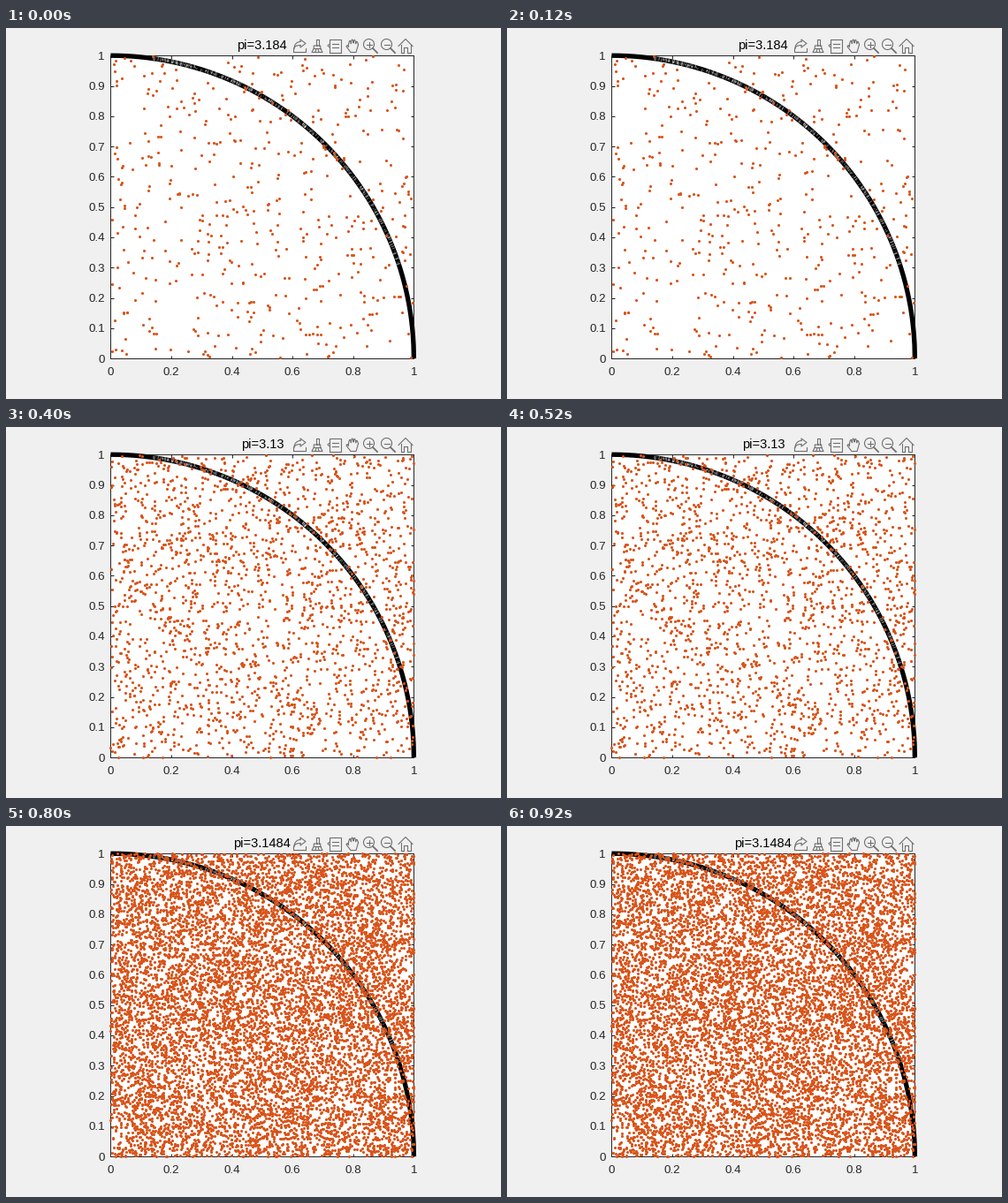
A matplotlib script that plays this animation: 560 px wide and 420 px high, repeating every 1000 ms.

```python
import numpy as np
import matplotlib.pyplot as plt
from matplotlib.animation import FuncAnimation
from matplotlib.collections import LineCollection

W, H, DPI = 560, 420, 100
PX = 72 / DPI                       # points per pixel
LEFT, TOP, SIDE = 118.4, 31.2, 343  # plot square in pixels
INK, ICON, ORANGE = "#262626", "#707070", "#D95319"

# number of points thrown -> estimate of pi
ESTIMATES = {500: 3.184, 1000: 3.172, 2000: 3.13, 5000: 3.156, 10000: 3.1484}
ROUNDS = list(ESTIMATES.items())

plt.rcParams["font.family"] = "Liberation Sans"
fig = plt.figure(figsize=(W / DPI, H / DPI), dpi=DPI, facecolor="#F0F0F0")


def throw(n, estimate):
    """Random points in the unit square whose share inside the arc gives the estimate."""
    hits = round(n * estimate / 4)
    pool = np.random.default_rng(n).random((3 * n, 2))
    inside = np.hypot(*pool.T) <= 1
    return np.vstack([pool[inside][:hits], pool[~inside][:n - hits]]).T


def make_plot():
    ax = fig.add_axes([LEFT / W, 1 - (TOP + SIDE) / H, SIDE / W, SIDE / H])
    ax.set(xlim=(0, 1), ylim=(0, 1))
    ax.set_axisbelow(True)
    xs, ys = np.linspace(0, 1, 6), np.linspace(0, 1, 11)
    ax.set_xticks(xs, [f"{v:.2g}" for v in xs])
    ax.set_yticks(ys, [f"{v:.2g}" for v in ys])
    ax.tick_params(direction="in", top=True, right=True, length=3.5 * PX,
                   width=PX, color=INK, labelcolor=INK, labelsize=13.33 * PX)
    ax.tick_params(axis="x", pad=9.4 * PX)
    ax.tick_params(axis="y", pad=6.6 * PX)
    for spine in ax.spines.values():
        spine.set(color=INK, linewidth=PX, zorder=0.9)
    return ax


def draw_arc(ax, seams=380):
    x = np.linspace(0, 1, 1001)
    ax.plot(x, np.sqrt(1 - x * x), color="black", lw=5.3 * PX, zorder=2,
            solid_capstyle="butt", solid_joinstyle="bevel", clip_on=False)
    # pale seams where the short segments meet
    rng = np.random.default_rng(4)
    angle = np.radians(rng.uniform(18, 82, seams))
    rim = np.column_stack([np.cos(angle), np.sin(angle)])
    reach = rng.uniform(0.6, 2.5, (seams, 1)) / SIDE
    middle = 1 + rng.uniform(-1, 1, (seams, 1)) / SIDE
    lines = np.stack([rim * (middle - reach), rim * (middle + reach)], axis=1)
    colors = np.ones((seams, 4))
    colors[:, 3] = rng.uniform(0.15, 0.6, seams)
    ax.add_collection(LineCollection(lines, colors=colors, linewidths=0.8 * PX,
                                     zorder=2.1), autolim=False)


def draw_toolbar(ax):
    centers = iter(range(332, 453, 20))

    def stroke(cx, x, y, lw=1.1):
        ax.plot(cx + np.asarray(x), 20 + np.asarray(y), color=ICON, lw=lw * PX)

    def mirrored(cx, x, y):
        stroke(cx, [*x, *(-v for v in reversed(x))], [*y, *reversed(y)])

    def export(cx):
        bend = np.linspace(0, np.pi / 2, 12)
        for bottom in (-4.5, -0.5):
            stroke(cx, 1 - 7 * np.cos(bend), 3 + (bottom - 3) * np.sin(bend))
        stroke(cx, [1, 1, 7, 1, 1], [-4.5, -7, -2.5, 2, -0.5])
        mirrored(cx, [7, 7], [3, 6.5])

    def brush(cx):
        mirrored(cx, [1.5, 1.5], [0, -7.5])
        mirrored(cx, [0, 3.7, 3.7, 6, 0], [0, 0, 3, 7.5, 7.5])
        mirrored(cx, [3.7], [3])
        for x in (-2, 2):
            stroke(cx, [x, x * 0.6], [7, 4.5])

    def data_tip(cx):
        mirrored(cx, [0, 6.5, 6.5, 0], [-7.5, -7.5, 7.5, 7.5])
        for y in (-2.5, 1.5):
            mirrored(cx, [3.5], [y])
        stroke(cx, [-6.5, -8, -6.5], [-1.5, 0, 1.5])

    def hand(cx):
        u = np.linspace(0, 1, 60)
        fingers = -1 - (6 - 14 * (u - 0.45) ** 2) * np.sqrt(abs(np.sin(4 * np.pi * u)))
        stroke(cx, 11 * u - 4.5, fingers)
        stroke(cx, [6.5, 4, -2, -7, -6, -4.5, -4.5], [-1, 7.5, 7.5, 1, -0.5, 1.5, -1])

    def zoom(cx, plus):
        a = np.linspace(0, 2 * np.pi, 40)
        stroke(cx, 6 * np.cos(a) - 1.5, 6 * np.sin(a) - 1.5)
        stroke(cx, [3, 8], [3, 8], lw=1.8)
        stroke(cx, [-4.5, 1.5], [-1.5, -1.5])
        if plus:
            stroke(cx, [-1.5, -1.5], [-4.5, 1.5])

    def home(cx):
        mirrored(cx, [8, 0], [0.5, -7.5])
        mirrored(cx, [5.5, 5.5, 2, 2], [-1.5, 7.5, 7.5, 1.5])

    for icon in (export, brush, data_tip, hand):
        icon(next(centers))
    zoom(next(centers), plus=True)
    zoom(next(centers), plus=False)
    home(next(centers))


plot = make_plot()
draw_arc(plot)
dots, = plot.plot([], [], "o", color=ORANGE, ms=3.1 * PX, mew=0,
                  zorder=3, clip_on=False, snap=False)

overlay = fig.add_axes([0, 0, 1, 1])
overlay.axis("off")
draw_toolbar(overlay)
overlay.set(xlim=(0, W), ylim=(H, 0))
title = overlay.text(289.8, 24.3, "", ha="center", va="baseline",
                     fontsize=14.67 * PX, color="black")


def update(i):
    n, estimate = ROUNDS[i]
    dots.set_data(*throw(n, estimate))
    title.set_text(f"pi={estimate:g}")
    return dots, title


anim = FuncAnimation(fig, update, frames=len(ROUNDS), interval=200,
                     repeat=True, repeat_delay=0)
plt.show()
```
